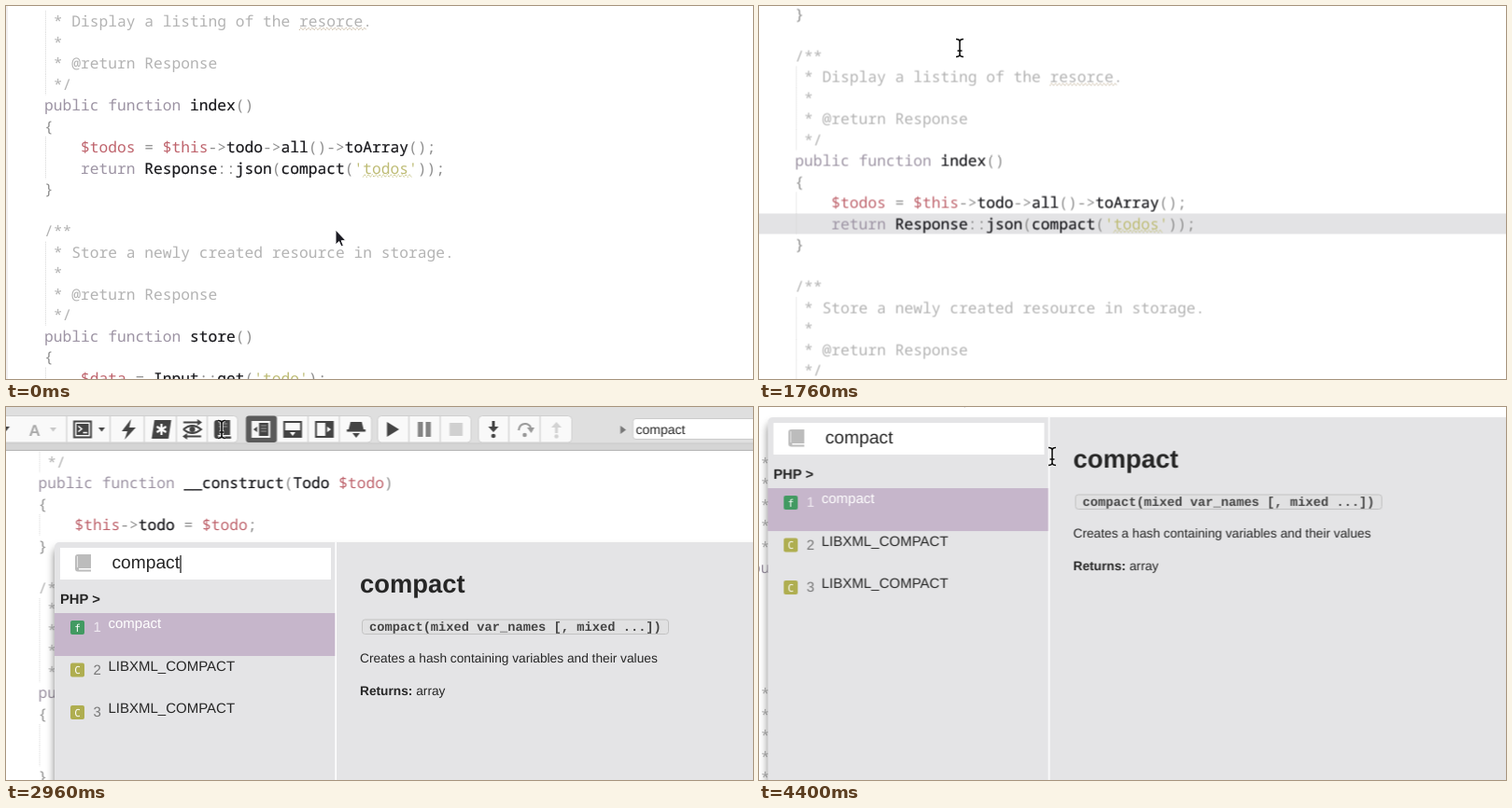
An HTML page for the animation above (4800 ms loop, 800 by 400 pixels).

```html
<!DOCTYPE html>
<html lang="en">
<head>
<meta charset="utf-8">
<title>Documentation lookup</title>
<style>
html, body { margin: 0; width: 100%; height: 100%; overflow: hidden; background: #fff; }
svg { display: block; width: 800px; height: 400px; }
text { white-space: pre; text-rendering: geometricPrecision; }
.code { font: 16.25px "Noto Sans Mono", "DejaVu Sans Mono", monospace; fill: #8f8f8f; }
.comment { fill: #b3b3b3; }
.keyword { fill: #9d94a4; }
.var { fill: #bf646d; }
.string { fill: #bebc75; }
.name { fill: #17171b; stroke: #17171b; stroke-width: .2; }
.guide { stroke: #d6d6d6; stroke-dasharray: 1 1; }
.wave { fill: none; stroke-dasharray: 1.3 .9; }
.ui { font-family: "Liberation Sans", Arial, sans-serif; fill: #262626; }
.bold { font-weight: bold; }
.ink { fill: #444; }
.line { fill: none; stroke: #444; stroke-width: 2; }

#camera, #mouse, .timed { animation: 4800ms step-end infinite; }
#camera { animation-name: pan; }
#mouse { animation-name: move; }
#highlight { animation-name: focus; }
#caret { animation-name: blink; }
#popup { animation-name: open; filter: drop-shadow(0 7px 4px rgba(0, 0, 0, .5)); }
#input-caret { animation-name: input-blink; }
#arrow { animation-name: arrow; }
#beam { animation-name: beam; }

@keyframes pan {
  0% { transform: translate(6.5px, -200px); }
  34.999% { transform: translate(5.5px, -177px); }
  36.666% { transform: translate(4px, -140.5px); }
  38.333% { transform: translate(2.5px, -95px); }
  39.999% { transform: translate(1.2px, -50px); }
  41.666% { transform: translate(.4px, -16px); }
  43.333%, 61.666% { transform: translate(0, 0); }
  63.333% { transform: translate(-17px, -53px); }
  64.999% { transform: translate(-34px, -107px); }
  66.666% { transform: translate(-40px, -127px); }
  68.333%, 100% { transform: translate(-42.5px, -134px); }
}
@keyframes move {
  0% { transform: translate(353px, 240px); animation-timing-function: steps(8); }
  13.333% { transform: translate(334px, 177px); }
  18.333% { transform: translate(334px, 177px); animation-timing-function: steps(3); }
  23.333% { transform: translate(322px, 177px); animation-timing-function: steps(8); }
  36.666% { transform: translate(215px, 45px); animation-timing-function: steps(4); }
  43.333% { transform: translate(178px, 51px); }
  46.666% { transform: translate(178px, 51px); animation-timing-function: steps(5); }
  54.999%, 61.666% { transform: translate(231px, 24px); }
  63.333% { transform: translate(214px, -29px); }
  64.999% { transform: translate(197px, -83px); }
  66.666% { transform: translate(191px, -103px); }
  69.999% { transform: translate(195px, -100px); animation-timing-function: steps(4); }
  76.666% { transform: translate(324px, 62px); animation-timing-function: steps(2); }
  79.999%, 100% { transform: translate(314px, 53px); }
}
@keyframes focus { 0%, 61.666%, 100% { opacity: 0; } 18.333% { opacity: 1; } }
@keyframes blink {
  0%, 28.333%, 48.333%, 61.666%, 100% { opacity: 0; }
  18.333%, 38.333%, 59.999% { opacity: 1; }
}
@keyframes open { 0% { opacity: 0; } 61.666%, 100% { opacity: 1; } }
@keyframes input-blink {
  0%, 71.666%, 91.666%, 100% { opacity: 0; }
  61.666%, 83.333% { opacity: 1; }
}
@keyframes arrow { 0% { opacity: 1; } 8.333%, 100% { opacity: 0; } }
@keyframes beam { 0% { opacity: 0; } 8.333%, 100% { opacity: 1; } }
</style>
</head>
<body>
<svg viewBox="0 0 800 400" xmlns="http://www.w3.org/2000/svg">
  <rect width="800" height="400" fill="#fff"/>
  <g id="camera">
    <path d="M-6 47V620" stroke="#e2dee0"/>
    <rect id="highlight" class="timed" x="-20" y="363" width="880" height="22" fill="#e3e3e5"/>
    <g id="editor"></g>
    <path id="caret" class="timed" d="M327.5 364V384" stroke="#111" stroke-width="1.5"/>

    <g id="toolbar">
      <rect x="-20" y="-10" width="900" height="57" fill="#dfdfdf"/>
      <rect x="-20" y="38.5" width="900" height="8" fill="#d5d5d5"/>
      <path d="M-20 39H880" stroke="#cacaca"/>
      <path d="M-20 46.5H880" stroke="#b4b4b4"/>
      <g id="buttons"></g>

      <path class="ink" d="M-4 21h8l-4 5zM99 22h7l-3.500 4.500z"/>
      <path fill="#c8c8c8" d="M47 22h7l-3.500 4.500z"/>
      <text class="ui bold" x="24.500" y="30.500" font-size="17" style="fill:#aaa">A</text>
      <path class="line" d="M73 15.500h18v17h-18z"/>
      <path class="ink" d="M75.500 18h13v12h-13z"/>
      <path d="M77.500 20.500l3.500 3-3.500 3M82.500 27.500h4.500" fill="none" stroke="#fff" stroke-width="1.500"/>
      <path class="ink" d="M134 13L124 26h6l-3 9 12-13h-7z"/>
      <path class="ink" d="M159 14h18l-3 20h-18z"/>
      <path d="M166.500 18v12M161.500 21l10 6M171.500 21l-10 6" stroke="#fff" stroke-width="2.200"/>
      <path class="line" d="M190 16.500h17M192 31.500h17M190 24q9.500-8 19 0q-9.500 8-19 0" stroke-width="1.600"/>
      <path class="ink" d="M205 13l5 3.500-5 3.500zM194 28l-5 3.500 5 3.500z"/>
      <circle class="ink" cx="199.500" cy="24" r="3"/>
      <path class="ink" d="M226 14h14v16h-13v1.500h14v2.500h-15q-3 0-3-3v-14q0-3 3-3z"/>
      <path d="M228 18h9M228 21h9" stroke="#999"/>

      <rect x="263" y="15" width="20" height="18" fill="#f7f7f7"/>
      <path class="ink" d="M271 17h10v14h-10zM269 21v6l-4-3z"/>
      <path d="M273 20h6M273 23h6M273 26h6" stroke="#999"/>
      <path class="line" d="M298 16h18v16h-18z"/>
      <path class="ink" d="M298 25h18v7h-18z"/>
      <path d="M304 27h6l-3 4z" fill="#fff"/>
      <path class="line" d="M332 16h18v16h-18z"/>
      <path class="ink" d="M342 16h8v16h-8z"/>
      <path d="M344 21v6l4-3z" fill="#fff"/>
      <path class="ink" d="M369 16h12l2 8h2v2.500h-20v-2.500h2zM371 28h8l-4 5z"/>

      <path class="ink" d="M408 16l13 8-13 8z"/>
      <path fill="#858585" d="M441 16h5.500v16h-5.500zM449.500 16h5.500v16h-5.500z"/>
      <rect x="475" y="17" width="14" height="14" fill="#d0d0d0"/>
      <path class="ink" d="M520.500 15h3v6h4l-5.500 6-5.500-6h4z"/>
      <circle class="ink" cx="522" cy="31" r="2.300"/>
      <path d="M549 25q1-7 7-7q4 0 6 4" fill="none" stroke="#999" stroke-width="2.200"/>
      <path d="M558 22h8l-3.500 6z" fill="#999"/>
      <circle cx="555.500" cy="30" r="2.300" fill="#999"/>
      <path d="M588 28v-6h-4l5.500-6 5.500 6h-4v6z" fill="#d3d3d3"/>
      <circle cx="589.500" cy="31.500" r="2.200" fill="#d3d3d3"/>
      <path d="M658 20l6 4.500-6 4.500z" fill="#777"/>
      <rect x="671.500" y="12.500" width="190" height="22" rx="3" fill="#fff" stroke="#ccc"/>
      <text class="ui" x="674.500" y="29" font-size="14">compact</text>
    </g>

    <g transform="translate(34 107)">
      <g id="popup" class="timed">
        <rect x="18" y="38" width="900" height="480" rx="5" fill="#e4e4e6"/>
        <rect x="24" y="44" width="290" height="34" fill="#fff"/>
        <path d="M43 51h14v15h-13v1.500h13v2h-14q-3 0-3-3v-12.500q0-3 3-3z" fill="#bcbcbc"/>
        <path d="M42.500 53v12" stroke="#e6e6e6"/>
        <text class="ui" x="79.500" y="66" font-size="19.200">compact</text>
        <path id="input-caret" class="timed" d="M153 52V71" stroke="#222" stroke-width="1.300"/>
        <text class="ui bold" x="24" y="104" font-size="14.800">PHP &gt;</text>
        <rect x="18" y="114" width="301" height="46" fill="#c6b6cb"/>
        <g id="results"></g>
        <path d="M319.200 38V518" stroke="#fff" stroke-width="1.600"/>
        <text class="ui bold" x="345" y="92" font-size="27.400">compact</text>
        <rect x="347.500" y="121" width="328" height="15.500" rx="3" fill="#e1e1e2" stroke="#c2c2c2"/>
        <text x="355" y="132.800" font-size="13.720" font-weight="bold" font-family="'Liberation Mono', 'Courier New', monospace" fill="#444">compact(mixed var_names [, mixed ...])</text>
        <text class="ui" x="345" y="167" font-size="13.720">Creates a hash containing variables and their values</text>
        <text class="ui" x="345" y="201.500" font-size="13.720"><tspan class="bold">Returns:</tspan> array</text>
      </g>
    </g>
  </g>

  <g id="mouse">
    <path id="arrow" class="timed" d="M0 0V16L3.700 12.600 6 18 8.400 17 6.200 11.700H11Z" fill="#1c1c24" stroke="#fff" stroke-width="1"/>
    <g id="beam" class="timed" fill="none">
      <path d="M-4-9.500q4 0 4 3V6.500q0 3-4 3M4-9.500q-4 0-4 3V6.500q0 3 4 3M-2.500 3h5" stroke="#fff" stroke-width="3.400" stroke-opacity=".8"/>
      <path d="M-4-9.500q4 0 4 3V6.500q0 3-4 3M4-9.500q-4 0-4 3V6.500q0 3 4 3M-2.500 3h5" stroke="#111" stroke-width="1.600"/>
    </g>
  </g>
</svg>
<script>
const NS = "http://www.w3.org/2000/svg";
const LEFT = 34.5, TOP = 59, PITCH = 22.5, CHAR = 9.75;

function add(parent, tag, attrs, content) {
  const el = document.createElementNS(NS, tag);
  for (const key in attrs) el.setAttribute(key, attrs[key]);
  if (content !== undefined) el.textContent = content;
  return parent.appendChild(el);
}
const byId = id => document.getElementById(id);

const source = ` */
public function __construct(Todo $todo)
{
    $this->todo = $todo;
}

/**
 * Display a listing of the resorce.
 *
 * @return Response
 */
public function index()
{
    $todos = $this->todo->all()->toArray();
    return Response::json(compact('todos'));
}

/**
 * Store a newly created resource in storage.
 *
 * @return Response
 */
public function store()
{
    $data = Input::get('todo');`;

function kind(token) {
  if (token[0] === "$") return "var";
  if (token[0] === "'") return "string";
  if (/^(public|function|return)$/.test(token)) return "keyword";
  return /^\w/.test(token) ? "name" : "";
}

const editor = byId("editor");
source.split("\n").forEach((line, row) => {
  const y = TOP + row * PITCH;
  if (line[0] === " ") {
    add(editor, "path", { class: "guide", d: `M${LEFT + 1.5} ${y - PITCH / 2}v${PITCH}` });
  }
  const text = add(editor, "text", { class: "code", x: LEFT, y: y + 5.5 });
  if (/^\s?[/*]/.test(line)) {
    add(text, "tspan", { class: "comment" }, line);
  } else {
    for (const token of line.match(/\$\w+|'\w+'|\w+|[^\w$']+/g) || []) {
      add(text, "tspan", { class: kind(token) }, token);
    }
  }
});

// Spelling marks
function wave(row, col, length, color) {
  let d = `M${LEFT + col * CHAR} ${TOP + row * PITCH + 9.5}`;
  for (let x = 0; x < length * CHAR; x += 4) d += "l2-3l2 3";
  add(editor, "path", { class: "wave", d, stroke: color });
}
wave(7, 28, 7, "#c4b49c");
wave(14, 35, 5, "#bebc75");

// Each group: left edge, then the right edges of its buttons
const groups = [
  [-20, 65, 111.5, 148, 182.5, 215.5, 248],
  [257, 290, 323.5, 357, 391.5],
  [398, 431.5, 465, 498],
  [506, 538.5, 572, 606]
];
const buttons = byId("buttons");
for (const [left, ...edges] of groups) {
  const right = edges[edges.length - 1];
  add(buttons, "rect", { x: left, y: 9.5, width: right - left, height: 28.5, rx: 4, fill: "#f9f9f9", stroke: "#cfcfcf" });
  for (const x of edges.slice(0, -1)) {
    add(buttons, "path", { d: `M${x} 10v28`, stroke: "#d6d6d6", "stroke-width": 1.4 });
  }
}
add(buttons, "rect", { x: 257, y: 9.5, width: 33, height: 28.5, rx: 3, fill: "#5a5a5a" });

const results = byId("results");
["compact", "LIBXML_COMPACT", "LIBXML_COMPACT"].forEach((name, i) => {
  const y = 130 + i * 45.5;
  const active = i === 0;
  const mono = "'DejaVu Sans Mono', monospace";
  add(results, "rect", { x: 35, y: y - 8, width: 15, height: 15, rx: 2, fill: active ? "#429a62" : "#afae50" });
  add(results, "text", { x: 42.5, y: y + 3.5, "font-size": 11, "text-anchor": "middle", "font-family": mono, fill: "#fff" }, active ? "f" : "C");
  add(results, "text", { class: "ui", x: 59.5, y: y + 4, "font-size": 15, style: `fill:${active ? "#efe9f1" : "#777"}` }, i + 1);
  add(results, "text", { class: "ui", x: 75.5, y, "font-size": 15, style: `fill:${active ? "#fff" : "#262626"}` }, name);
});
</script>
</body>
</html>
```
